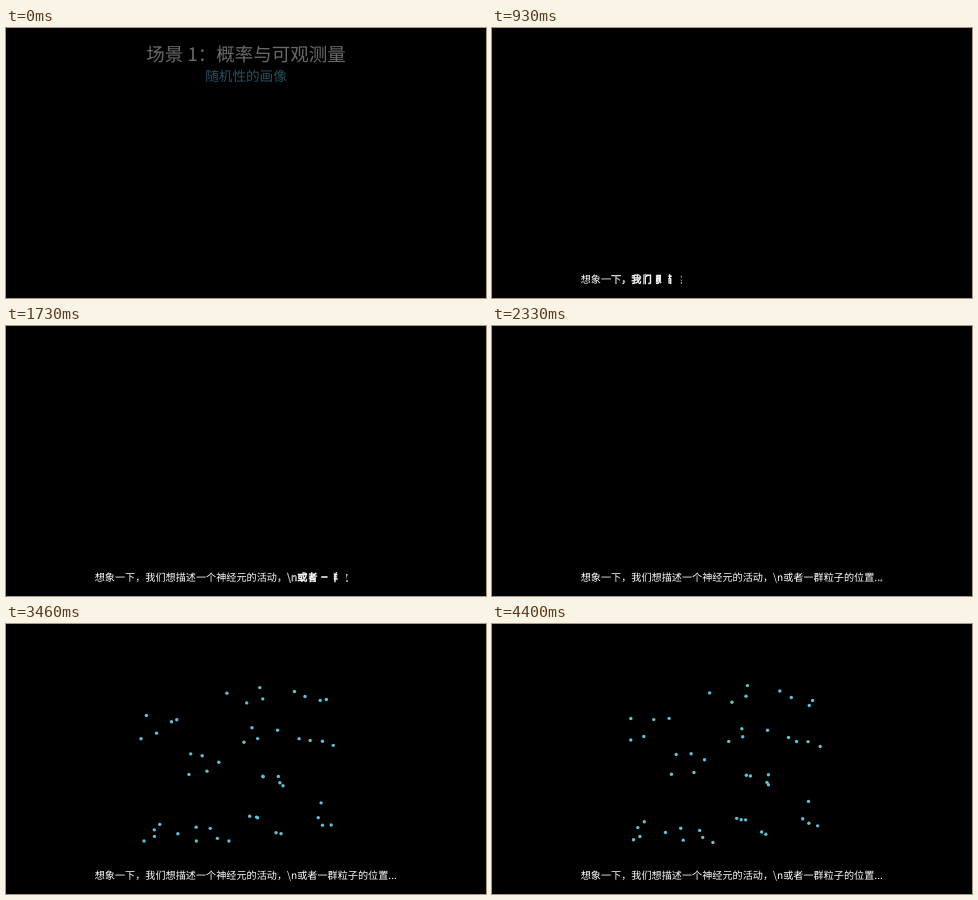
An HTML page with a canvas for the animation above (4.47 s loop, 480x270 px).

```html
<!DOCTYPE html>
<html lang="zh-CN">
<head>
<meta charset="utf-8">
<style>
html, body { margin: 0; width: 100%; height: 100%; overflow: hidden; background: #000; }
canvas { display: block; }
</style>
</head>
<body>
<canvas id="stage" width="480" height="270"></canvas>
<script>
const ctx = document.getElementById("stage").getContext("2d");
const LOOP = 4470, FPS = 15, TICKS = 67;
const WRITE_START = 7, WRITE_LENGTH = 30;
const DOTS_START = 37, DOTS_LENGTH = 15, DOT_COUNT = 50;
const FONT = "'Noto Sans CJK SC', 'Noto Sans CJK', sans-serif";
const CAPTION = [..."想象一下，我们想描述一个神经元的活动，\\n或者一群粒子的位置..."];
const CAPTION_SIZE = 10.13, BASELINE = 254.8;
// Dots gather loosely around these places.
const HUBS = [
  [157, 103], [198, 143], [154, 211], [206, 210], [254, 200], [262, 157],
  [251, 112], [235, 77], [302, 69], [306, 122], [308, 190]
];

const clamp = v => Math.min(1, Math.max(0, v));
const sigmoid = v => 1 / (1 + Math.exp(-v));
const smooth = v => clamp((sigmoid(10 * (v - .5)) - sigmoid(-5)) / (1 - 2 * sigmoid(-5)));

let seed = 7;
const random = () => (seed = seed * 16807 % 2147483647) / 2147483647;
const spread = size => (random() * 2 - 1) * size;

// Each dot has a home, an entry delay and a random walk, one step per tick.
const dots = Array.from({ length: DOT_COUNT }, (_, i) => {
  const [hubX, hubY] = HUBS[i % HUBS.length];
  let x = hubX + spread(22), y = Math.min(217, hubY + spread(14));
  const walk = Array.from({ length: TICKS - DOTS_START - DOTS_LENGTH }, () => {
    const place = [x, y];
    x += spread(1);
    y += spread(1);
    return place;
  });
  return { walk, delay: i / DOT_COUNT * .8 };
});

function centered(text, size, y, color) {
  ctx.font = `${size}px ${FONT}`;
  ctx.textAlign = "center";
  ctx.fillStyle = color;
  ctx.fillText(text, 240, y);
}

function drawTitle(tick) {
  ctx.globalAlpha = 1 - smooth((tick + 8) / 15);
  centered("场景 1：概率与可观测量", 18.5, 33, "#fff");
  centered("随机性的画像", 13.6, 52.6, "#58c4dd");
}

// The outline of a glyph appears from its right side.
function outline(glyph, x, width, shown, lineWidth) {
  ctx.save();
  ctx.beginPath();
  ctx.rect(x + width * (1 - shown), BASELINE - 12, width * shown + 1, 16);
  ctx.clip();
  ctx.globalAlpha = 1;
  ctx.lineWidth = lineWidth;
  ctx.strokeText(glyph, x, BASELINE);
  ctx.restore();
}

// Every glyph is outlined first, then the outline thins into the fill.
function drawCaption(tick) {
  const lag = 4 / (CAPTION.length + 1);
  const time = (tick - WRITE_START) / WRITE_LENGTH * (1 + lag * (CAPTION.length - 1));
  ctx.font = `${CAPTION_SIZE}px ${FONT}`;
  ctx.textAlign = "left";
  ctx.fillStyle = ctx.strokeStyle = "#fff";
  let x = 88.7;
  CAPTION.forEach((glyph, i) => {
    const p = clamp(time - lag * i), fill = clamp(2 * p - 1);
    const width = ctx.measureText(glyph).width;
    if (p > 0 && p < 1) outline(glyph, x, width, clamp(2 * p), .7 * (1 - fill));
    ctx.globalAlpha = fill;
    ctx.fillText(glyph, x, BASELINE);
    x += width;
  });
}

function drawDots(tick) {
  const time = (tick - DOTS_START) / DOTS_LENGTH;
  const step = Math.max(0, tick - DOTS_START - DOTS_LENGTH);
  ctx.fillStyle = "#66bdd7";
  for (const { walk, delay } of dots) {
    ctx.globalAlpha = smooth(clamp((time - delay) / .2));
    ctx.beginPath();
    ctx.arc(...walk[step], 1.7, 0, 2 * Math.PI);
    ctx.fill();
  }
}

function render(now) {
  const tick = Math.floor((now % LOOP + 7) * FPS / 1000) % TICKS;
  ctx.textRendering = "geometricPrecision";
  ctx.globalAlpha = 1;
  ctx.fillStyle = "#000";
  ctx.fillRect(0, 0, 480, 270);
  if (tick < WRITE_START) drawTitle(tick);
  else drawCaption(tick);
  if (tick >= DOTS_START) drawDots(tick);
  requestAnimationFrame(render);
}
render(0);
</script>
</body>
</html>
```
